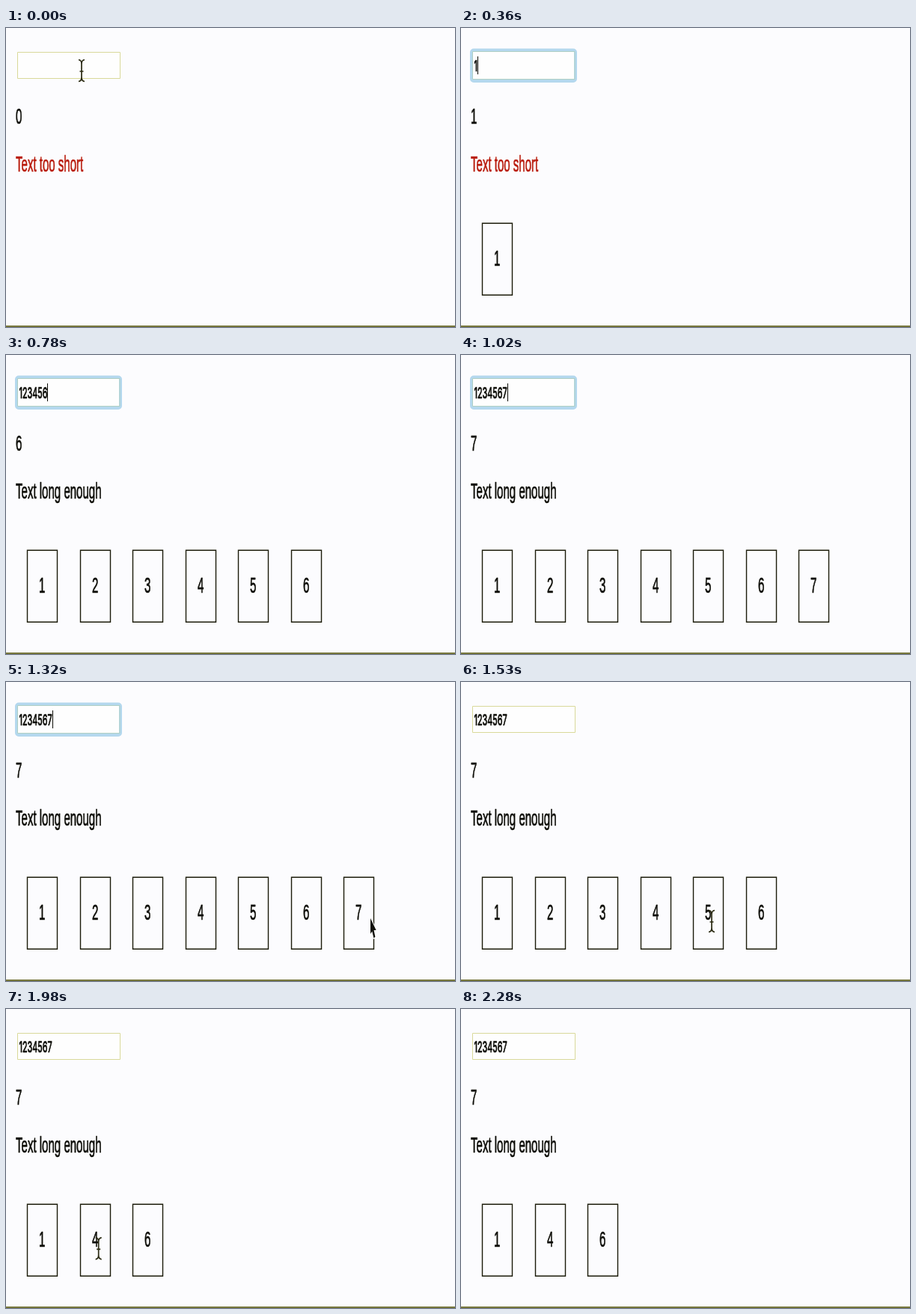
An HTML page with a canvas that plays this animation: 600x400 px, repeating every 2310 ms.

```html
<!DOCTYPE html>
<html lang="en">
<head>
<meta charset="utf-8">
<title>Text length and character cards</title>
<style>
  html, body { margin: 0; width: 100%; height: 100%; overflow: hidden; background: #fcfcfe; }
  canvas { display: block; width: 600px; height: 400px; }
</style>
</head>
<body>
<canvas id="stage" width="600" height="400"></canvas>
<script>
const ctx = document.getElementById('stage').getContext('2d');
const LOOP = 2310, STEP = 30;
// The whole page is shown at a non-square aspect.
const SX = 0.94, SY = 1.82;
const INK = '#0c0c06', RED = '#b91b0c', PAPER = '#fcfcfe';
const BODY_FONT = '16px "Liberation Sans", Arial, sans-serif';
const INPUT_FONT = '500 11.4px Inter, Roboto, sans-serif';
const FOCUS = 180, BLUR = 1380, MIN_LENGTH = 5;

const keyTimes = [300, 390, 480, 570, 660, 750, 840];
const removals = [['7', 1380], ['5', 1560], ['3', 1710], ['2', 1980]];

// Each pointer path holds [time, x, y] stops.
const pointerPaths = [
  [[0, 101, 57], [90, 101, 57], [180, 105, 32], [270, 105, 32]],
  [[1140, 105, 32], [1290, 487, 316], [1380, 487, 316], [1500, 336, 320],
   [1560, 334, 320], [1680, 194, 318], [1800, 193, 318], [1920, 124, 320],
   [2160, 122, 322], [2250, 122, 400]]
];

const ease = p => p * p * (3 - 2 * p);

function pointerAt(t) {
  const path = pointerPaths.find(p => t >= p[0][0] && t < p[p.length - 1][0]);
  if (!path) return null;
  const i = path.findIndex(stop => stop[0] > t);
  const [t0, x0, y0] = path[i - 1], [t1, x1, y1] = path[i];
  const p = ease((t - t0) / (t1 - t0));
  return { x: x0 + (x1 - x0) * p, y: y0 + (y1 - y0) * p };
}

function text(str, x, y, { font = BODY_FONT, color = INK, align = 'left' } = {}) {
  ctx.save();
  ctx.translate(x, y);
  ctx.scale(SX, SY);
  ctx.font = font;
  ctx.fillStyle = ctx.strokeStyle = color;
  ctx.textAlign = align;
  ctx.lineWidth = 0.4;
  ctx.lineJoin = 'round';
  ctx.fillText(str, 0, 0);
  ctx.strokeText(str, 0, 0);
  const width = ctx.measureText(str).width * SX;
  ctx.restore();
  return width;
}

function outline(x, y, w, h, color, line, radius = 0) {
  ctx.beginPath();
  ctx.roundRect(x, y, w, h, radius);
  ctx.strokeStyle = color;
  ctx.lineWidth = line;
  ctx.stroke();
}

function drawInput(value, focused) {
  ctx.fillStyle = '#fefefe';
  ctx.fillRect(15, 32, 138, 36);
  if (focused) {
    outline(14, 29.5, 139, 41.5, '#b4d8ee', 4, 3);
    outline(15.5, 31.5, 136.5, 37, '#b0d0c4', 1);
  } else {
    outline(15.5, 32.5, 137, 35, '#d9d99a', 1);
  }
  const width = text(value, 17.5, 58, { font: INPUT_FONT });
  if (focused) {
    ctx.fillStyle = INK;
    ctx.fillRect(Math.round(17.5 + width), 38, 1, 24);
  }
}

function drawCard(char, slot) {
  const x = Math.round(28.4 + slot * 70.45);
  outline(x + 0.5, 261.3, 40, 96, '#1c1c0a', 1.4);
  text(char, x + 20.3, 318.3, { align: 'center' });
}

function drawBeam(x, y) {
  ctx.beginPath();
  ctx.moveTo(x - 4, y - 14.5);
  ctx.quadraticCurveTo(x, y - 14, x, y - 9);
  ctx.quadraticCurveTo(x, y - 14, x + 4, y - 14.5);
  ctx.moveTo(x, y - 9);
  ctx.lineTo(x, y + 9);
  ctx.moveTo(x - 4, y + 14.5);
  ctx.quadraticCurveTo(x, y + 14, x, y + 9);
  ctx.quadraticCurveTo(x, y + 14, x + 4, y + 14.5);
  ctx.moveTo(x - 2.5, y + 1);
  ctx.lineTo(x + 2.5, y + 1);
  ctx.strokeStyle = '#2a2a12';
  ctx.lineWidth = 1.7;
  ctx.stroke();
}

function drawArrow(x, y) {
  const points = [[0, 0], [0, 21], [2.2, 17.5], [4.4, 26.5], [6.4, 25], [4.6, 16], [7.6, 16]];
  ctx.beginPath();
  points.forEach(([dx, dy]) => ctx.lineTo(x + dx, y + dy));
  ctx.closePath();
  ctx.strokeStyle = '#ffffff';
  ctx.lineWidth = 2;
  ctx.stroke();
  ctx.fillStyle = '#10100a';
  ctx.fill();
}

function drawPointer({ x, y }, cardCount) {
  const inInput = x > 13 && x < 155 && y > 28 && y < 72;
  const onDigit = Math.abs(y - 309) < 17 && Array.from({ length: cardCount })
    .some((_, i) => Math.abs(x - 48.5 - i * 70.45) < 5.5);
  (inInput || onDigit ? drawBeam : drawArrow)(x, y);
}

function draw(t) {
  const length = keyTimes.filter(k => t >= k).length;
  const value = '1234567'.slice(0, length);
  const removed = removals.filter(r => t >= r[1]).map(r => r[0]);
  const cards = [...value].filter(c => !removed.includes(c));

  ctx.fillStyle = PAPER;
  ctx.fillRect(0, 0, 600, 400);
  drawInput(value, t >= FOCUS && t < BLUR);
  text(String(length), 13, 128.3);
  const short = length < MIN_LENGTH;
  text(short ? 'Text too short' : 'Text long enough', 13, 192.3, { color: short ? RED : INK });
  cards.forEach(drawCard);
  ctx.fillStyle = '#77773c';
  ctx.fillRect(0, 398, 600, 2);

  const pointer = pointerAt(t);
  if (pointer) drawPointer(pointer, cards.length);
}

const start = performance.now();
function tick() {
  const t = (performance.now() - start) % LOOP;
  draw(Math.floor(t / STEP) * STEP);
  requestAnimationFrame(tick);
}
tick();
</script>
</body>
</html>
```
